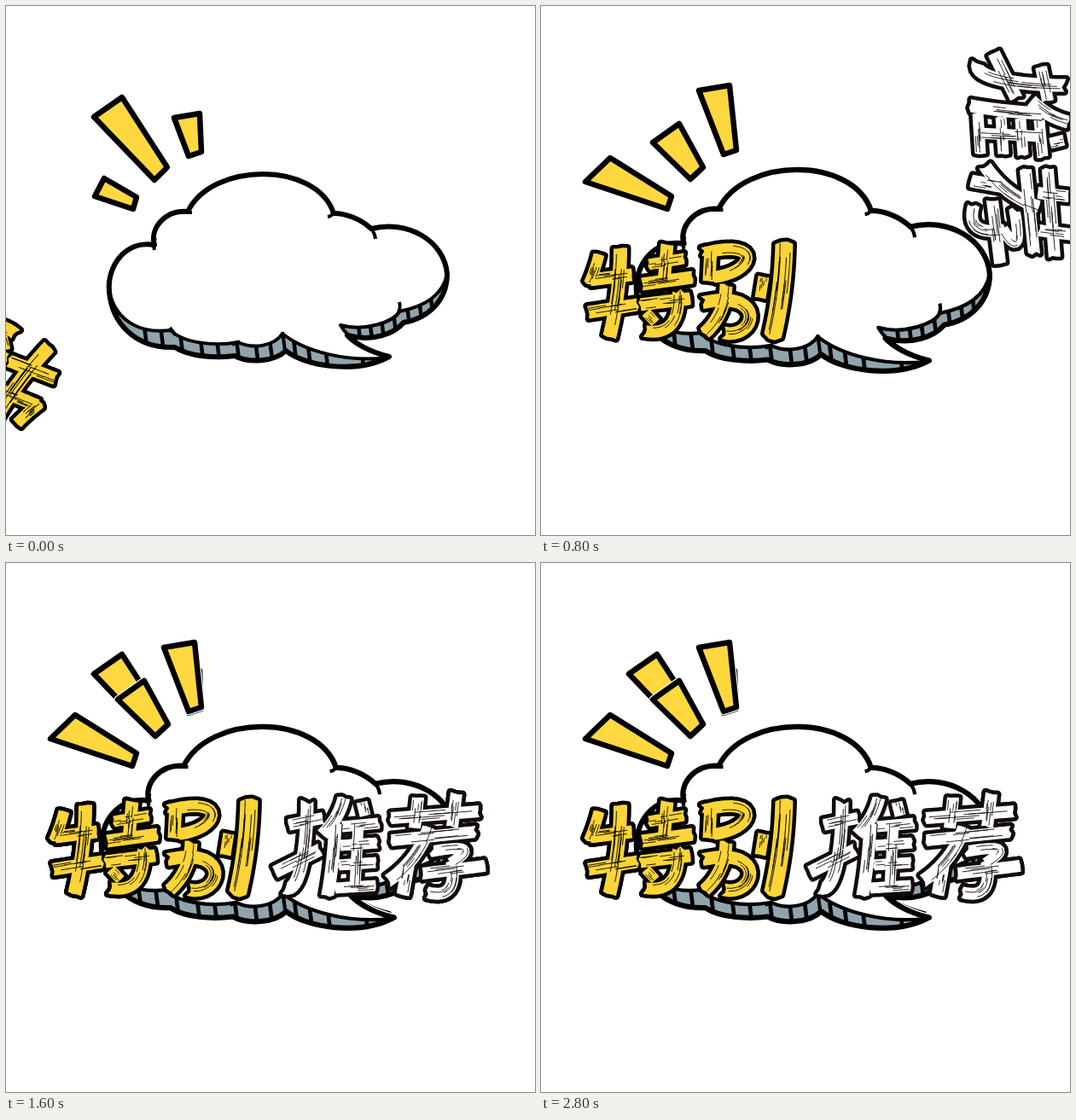
Write an HTML page with a canvas that moves like this. It is 620 px wide and 620 px high and loops after 3 s.

```html
<!DOCTYPE html>
<html lang="zh">
<head>
<meta charset="utf-8">
<title>特别推荐</title>
<style>
  html, body { margin: 0; width: 100%; height: 100%; overflow: hidden; background: #fff; }
  canvas { display: block; }
</style>
</head>
<body>
<canvas id="stage" width="620" height="620" role="img" aria-label="特别推荐"></canvas>
<script>
const ctx = document.getElementById('stage').getContext('2d');
const FRAME = 200, COUNT = 15;
const YELLOW = '#ffd83f', INK = '#000', SHADE = '#90a4ae';

let seed = 7;
const random = () => (seed = (seed * 16807) % 2147483647) / 2147483647;
const mix = (a, b, t) => a + (b - a) * t;

// Point on a Bezier curve of any degree.
function bezier(points, t) {
  while (points.length > 1)
    points = points.slice(1).map((p, i) => [mix(points[i][0], p[0], t), mix(points[i][1], p[1], t)]);
  return points[0];
}

// Point beside the curve, shifted along its normal.
function beside(points, t, offset) {
  const [x, y] = bezier(points, t);
  const [ax, ay] = bezier(points, t - 0.01), [bx, by] = bezier(points, t + 0.01);
  const length = Math.hypot(bx - ax, by - ay);
  return [x - (by - ay) / length * offset, y + (bx - ax) / length * offset];
}

// One brush stroke: a ribbon with rough ends and dry streaks along it.
function brush(text) {
  const [curve, width = 15] = text.split('/');
  const points = curve.trim().split(' ').map(p => p.split(',').map(Number));
  const ribbon = new Path2D(), streaks = new Path2D(), steps = 16, w = +width;
  const end = t => { for (let k = 0; k <= 3; k++) {
    const side = (t ? 1 : -1) * (0.5 - k / 3) * w;
    ribbon.lineTo(...beside(points, t + (random() - 0.5) * 0.05, side));
  } };
  for (let i = 1; i < steps; i++) ribbon.lineTo(...beside(points, i / steps, w / 2));
  end(1);
  for (let i = steps - 1; i > 0; i--) ribbon.lineTo(...beside(points, i / steps, -w / 2));
  end(0);
  ribbon.closePath();
  for (let n = 0; n < w * 0.45; n++) {
    const offset = (random() - 0.5) * w * 0.75, start = random() * 0.6, span = 0.15 + random() * 0.35;
    for (let i = 0; i <= 6; i++) {
      const p = beside(points, Math.min(0.97, start + span * i / 6), offset);
      i ? streaks.lineTo(...p) : streaks.moveTo(...p);
    }
  }
  return { ribbon, streaks };
}

const word = (x, y, fill, ink, ...glyphs) =>
  ({ x, y, fill, ink, strokes: glyphs.join(';').split(';').map(brush) });

const special = word(174, 333, '#fbd438', INK,
  // 特
  '68,291 64,308 56,326/13; 58,321 106,315; 93,284 93,335 80,389/16; 56,359 113,350;' +
  '126,303 168,296/13; 148,279 144,324; 118,326 178,318; 116,350 174,343;' +
  '161,334 164,388 122,381/14; 123,359 134,371/12',
  // 别
  '199,283 197,322; 193,289 262,272 250,314 200,318/14;' +
  '192,347 266,332 252,392 214,383; 217,327 216,362 191,384; 261,317 257,342/13; 285,277 284,335 271,389/21');

const recommend = word(438, 332, '#fff', '#120c0b',
  // 推
  '331,307 371,299/14; 353,279 353,335 344,388 327,381; 316,362 368,336;' +
  '396,275 390,300 371,318; 386,304 384,350 377,389; 417,280 421,296/13;' +
  '394,309 437,305/13; 392,331 435,328/13; 390,354 434,351/13; 386,381 433,378/13; 413,304 409,380/13',
  // 荐
  '452,299 555,291/14; 483,275 479,311/14; 528,270 523,309/14; 452,325 551,315/14;' +
  '496,308 484,348 447,373; 472,350 465,389; 499,338 562,327 521,352/13;' +
  '522,348 531,396 494,386/14; 488,364 561,355/14');

// Cloud: shared top edge, with an outer and an inner lower edge.
const TOP_EDGE = 'M517 314C514 275 470 250 428 261C415 249 398 243 384 243C364 182 242 182 213 241' +
  'C188 238 168 260 174 280C140 274 118 305 121 335';
const outer = new Path2D(TOP_EDGE + 'C124 370 150 402 198 400C215 411 245 413 268 410C285 419 315 417 328 404' +
  'C350 422 410 432 449 411C425 405 408 395 400 386C430 394 455 384 466 371C495 366 517 345 517 314Z');
const INNER_EDGE = 'C130 372 160 384 193 380C205 393 240 400 272 394C290 403 315 398 324 384' +
  'C350 405 400 418 447 412C425 403 402 392 392 374C420 382 455 370 461 358C490 352 512 340 517 314';
const inner = new Path2D(TOP_EDGE + INNER_EDGE + 'Z');
const innerLine = new Path2D('M121 335' + INNER_EDGE);
const notches = new Path2D('M174 286Q172 279 175 272M218 242L207 242M377 247Q384 246 383 240' +
  'M433 273Q432 265 427 260M461 347Q463 354 459 361M192 377L199 386M324 382L327 404M265 397L274 393');
const hatching = new Path2D([163, 182, 204, 227, 246, 269, 291, 308, 336, 352, 372, 414, 428, 442, 457, 474, 489, 503]
  .map(x => `M${x - 6} 335l12 95`).join(''));

const polygon = points => new Path2D(`M${points}Z`);
const small = {
  scale: 1,
  rays: ['103 130 136 107 189 189 174 204', '197 131 227 126 229 171 214 176', '115 202 153 224 149 238 104 223'].map(polygon)
};
const large = {
  scale: 1.045,
  rays: ['131 160 162 138 190 189 175 203', '185 99 221 93 229 169 214 174', '81 178 153 223 148 238 52 206'].map(polygon)
};

function line(path, width, color = INK) {
  ctx.lineWidth = width;
  ctx.strokeStyle = color;
  ctx.stroke(path);
}

function fill(path, color) {
  ctx.fillStyle = color;
  ctx.fill(path);
}

function drawBubble({ scale, rays }) {
  for (const ray of rays) {
    line(ray, 9, '#fff');
    fill(ray, YELLOW);
    line(ray, 6.5);
  }
  ctx.save();
  ctx.translate(319, 310);
  ctx.scale(scale, scale);
  ctx.translate(-319, -310);
  line(outer, 8.5, '#fff');
  fill(outer, SHADE);
  ctx.save();
  ctx.clip(outer);
  line(hatching, 4.5);
  ctx.restore();
  fill(inner, '#fff');
  line(innerLine, 4);
  line(notches, 4);
  line(outer, 6);
  ctx.restore();
}

function drawWord(item, [x, y, degrees] = [item.x, item.y, 0]) {
  ctx.save();
  ctx.translate(x, y);
  ctx.rotate(degrees * Math.PI / 180);
  ctx.translate(-item.x, -item.y);
  for (const s of item.strokes) line(s.ribbon, 9, item.ink);
  for (const s of item.strokes) fill(s.ribbon, item.fill);
  for (const s of item.strokes) line(s.streaks, 0.9, item.ink);
  ctx.restore();
}

// Both words tumble in; each pose is x, y, angle.
const specialPath = [[-58, 400, -150], [36, 374, -90], [136, 364, -30]];
const recommendPath = [[648, 73, 150], [561, 178, 90], [490, 262, 28]];

// The stage is wiped only at these steps; elsewhere a step paints over the last one.
const wipes = [0, 2, 3, 4, 6, 9, 13];

function drawStep(step) {
  drawBubble(step > 0 && step % 2 === 0 ? large : small);
  drawWord(special, specialPath[step]);
  if (step >= 3) drawWord(recommend, recommendPath[step - 3]);
}

let shown = -1;
function tick(now) {
  const step = Math.floor(now / FRAME) % COUNT;
  if (step !== shown) {
    shown = step;
    fill(polygon('0 0 620 0 620 620 0 620'), '#fff');
    for (let s = Math.max(...wipes.filter(w => w <= step)); s <= step; s++) drawStep(s);
  }
  requestAnimationFrame(tick);
}

ctx.lineJoin = 'round';
ctx.lineCap = 'butt';
tick(performance.now());
</script>
</body>
</html>
```
